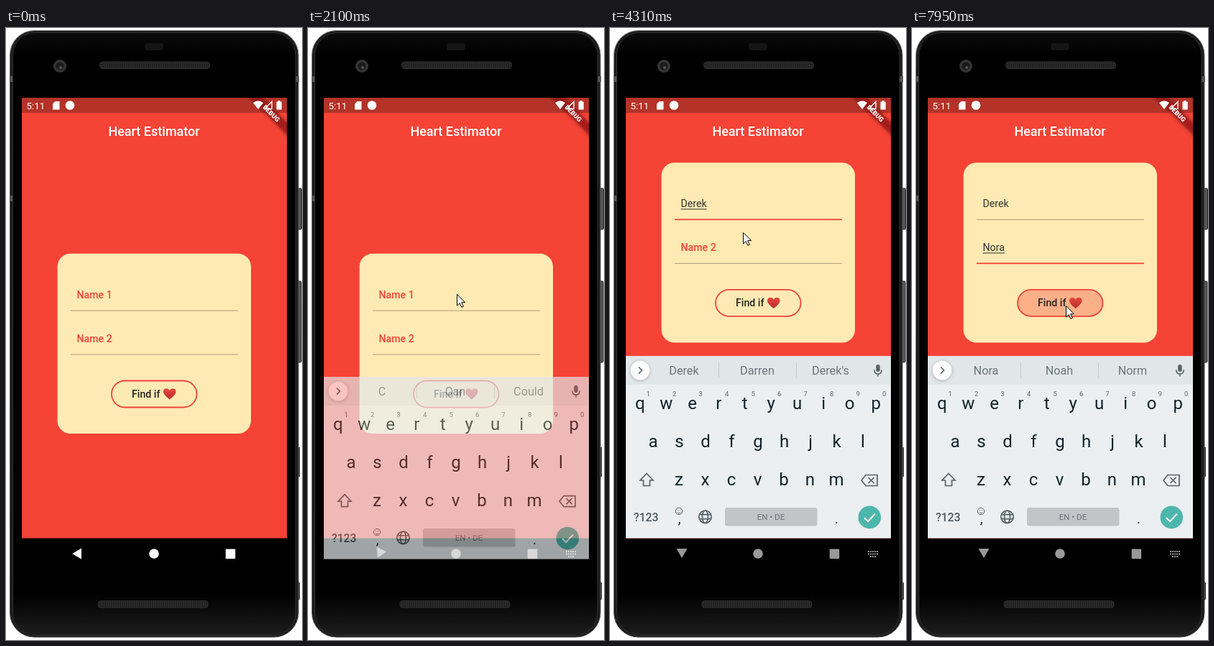
Write an HTML page that moves like this. It is 412 px wide and 851 px high and loops after 8 s.

```html
<!DOCTYPE html>
<html lang="en">
<head>
<meta charset="utf-8">
<title>Phone form</title>
<style>
  html, body { margin: 0; width: 100%; height: 100%; overflow: hidden; background: #fff; }
  svg { display: block; width: 100%; height: 100%; font-family: Roboto, sans-serif; }
  text { white-space: pre; }
  .mid { text-anchor: middle; }
  .line { fill: none; stroke: #566267; stroke-width: 1.7; }
</style>
</head>
<body>
<svg viewBox="0 0 412 851">
  <defs>
    <clipPath id="screen"><rect x="22" y="97" width="369" height="656"/></clipPath>
    <linearGradient id="edge" x2="0" y2="1">
      <stop offset="0" stop-color="#858585"/><stop offset=".08" stop-color="#5a5a5a"/><stop offset="1" stop-color="#4a4a4a"/>
    </linearGradient>
    <linearGradient id="glass" x2="0" y2="1">
      <stop offset="0" stop-color="#0b0b0b"/><stop offset=".04" stop-color="#000"/>
      <stop offset=".93" stop-color="#000"/><stop offset="1" stop-color="#1e1e1e"/>
    </linearGradient>
    <linearGradient id="love" x2="0" y2="1">
      <stop offset="0" stop-color="#ea4a3c"/><stop offset="1" stop-color="#b92c2b"/>
    </linearGradient>
    <pattern id="mesh" width="3" height="3" patternUnits="userSpaceOnUse">
      <rect width="3" height="3" fill="#1d1d1d"/><circle cx="1.5" cy="1.5" r=".9" fill="#393939"/>
    </pattern>
    <filter id="soft" x="-50%" y="-150%" width="200%" height="400%"><feGaussianBlur stdDeviation="2.5"/></filter>
  </defs>

  <!-- phone -->
  <g fill="#565656" stroke="#2a2a2a">
    <rect x="404" y="223" width="7.5" height="57" rx="1.5"/>
    <rect x="404" y="352" width="7" height="113" rx="1.5"/>
    <rect x="404" y="583" width="4.5" height="41" rx="1"/>
    <rect x="404" y="771" width="4.5" height="24" rx="1"/>
  </g>
  <rect x="5.5" y="3.500" width="401.500" height="843.500" rx="34" fill="#1c1c1c" stroke="url(#edge)"/>
  <path d="M5 67h6v8H5zM5 233h6v8H5zM402 67h6v8h-6z" fill="#555"/>
  <rect x="9.500" y="6.500" width="393.500" height="838" rx="31" fill="url(#glass)" stroke="#303030"/>
  <rect x="193" y="21" width="26" height="10" rx="4" fill="#141414"/>
  <circle cx="75" cy="53" r="9" fill="#353535"/>
  <circle cx="75" cy="53" r="5.500" fill="#1a1a1c"/>
  <circle cx="76" cy="55" r="2" fill="#50555b"/>
  <rect x="130.500" y="47" width="153" height="9.500" rx="4" fill="url(#mesh)" stroke="#303030"/>
  <rect x="128" y="796.500" width="153" height="9.500" rx="4" fill="url(#mesh)" stroke="#303030"/>

  <g clip-path="url(#screen)">
    <path d="M22 97H391V753H22z"/>
    <path d="M22 97H391V709.500H22z" fill="#f54336"/>
    <text class="mid" x="206" y="150" font-size="18" font-weight="500" fill="#fff">Heart Estimator</text>
    <path d="M22 97H391V118H22z" fill="#b43228"/>
    <g transform="translate(391 97) rotate(45)">
      <rect x="-60" y="25" width="120" height="11" opacity=".5" filter="url(#soft)"/>
      <rect x="-60" y="25" width="120" height="11" fill="#b71c1c" opacity=".63"/>
      <text class="mid" y="33.800" font-size="9" font-weight="900" fill="#fff">DEBUG</text>
    </g>
    <g fill="#fff">
      <text x="28.500" y="112.500" font-size="13.300">5:11</text>
      <path d="M68.500 102H74.500V113.500H65V105.500z"/>
      <circle cx="89" cy="107.500" r="6.300"/>
      <path d="M344 104q7-5.500 14 0l-7 9z"/>
      <path d="M370 102.500v10h-10z" fill="none" stroke="#fff" stroke-width="1.400"/>
      <path d="M376.500 102.500h2v-1.500h3.200v1.500h2v11h-7.200z"/>
    </g>

    <g id="card">
      <rect x="71.600" y="313.800" width="269.400" height="250.300" rx="18" fill="#ffeab3"/>
      <g id="fields"></g>
      <rect id="fill" x="147" y="490.500" width="118.500" height="37" rx="18.500" fill="#f44336" fill-opacity="0" stroke="#f0433a" stroke-width="1.800"/>
      <text x="175" y="514" font-size="14.200" font-weight="500" fill="#222">Find if</text>
      <path d="M227.800 516.500C221 511 219 508.500 219 505.500C219 500.500 225.500 500 227.800 504C230 500 236.500 500.500 236.500 505.500C236.500 508.500 234.500 511 227.800 516.500z" fill="url(#love)"/>
    </g>

    <g id="kb">
      <path d="M22 456.200H391V709.500H22z" fill="#ebeff2"/>
      <path d="M22 456.200H391V496H22z" fill="#e1e6e9"/>
      <g id="words" fill="#6b767b" font-size="16.200">
        <path d="M151.500 465.500V486.500M259.500 465.500V486.500" stroke="#c6cbce"/>
      </g>
      <g id="tools" class="line">
        <circle cx="90" cy="474.500" r="5"/><path d="M93.500 478L100 484.500" stroke-width="2.200"/>
        <path d="M141 470h10q2 0 2 2v6l-5 5h-7q-2 0-2-2v-9q0-2 2-2zM153 478h-5v5M142.500 477q3 4 6 0M143 473.500h2M147.500 473.500h2"/>
        <text class="mid" x="199.500" y="480.500" font-size="12.500" font-weight="900" fill="#566267" stroke="none">GIF</text>
        <path d="M248 469.500h14v14h-14z" fill="#566267" stroke="none"/>
        <path d="M287 465.500V486.500" stroke="#c6cbce" stroke-width="1"/>
        <path d="M313 476h.1M320 476h.1M327 476h.1" stroke-width="4" stroke-linecap="round"/>
      </g>
      <circle cx="42" cy="477" r="13.500" opacity=".22" filter="url(#soft)"/>
      <circle cx="42" cy="476" r="13.300" fill="#fff"/>
      <path id="chevron" d="M40 471.500L44.500 476L40 480.500" class="line"/>
      <rect x="370.300" y="468" width="5.400" height="10" rx="2.700" fill="#566267"/>
      <path d="M367.800 475.500q.3 5.500 5.200 5.500t5.200-5.500M373 481v3.500" class="line"/>

      <g id="keys" class="mid" font-size="24" fill="#10222a"></g>
      <path id="shift" d="M51 619.500L60 629H55.500V636.500H46.500V629H42z" class="line"/>
      <path d="M356 621.500h16v15h-16l-6-7.500zM359.500 625l8 8m0-8l-8 8" class="line"/>
      <text x="33" y="685.500" font-size="15.700" font-weight="500" fill="#4b5a60">?123</text>
      <g class="line" style="stroke-width:1">
        <circle cx="96" cy="672" r="4.700"/><path d="M93.500 673.500q2.500 3 5 0M94 670.500h1M97 670.500h1"/>
      </g>
      <text class="mid" x="96.500" y="688.500" font-size="19" fill="#10222a">,</text>
      <g class="line">
        <circle cx="132.500" cy="679.700" r="8.700"/><ellipse cx="132.500" cy="679.700" rx="4" ry="8.700"/>
        <path d="M124 676.700h17M124 682.700h17"/>
      </g>
      <rect x="160" y="667" width="128.500" height="25.500" rx="3" fill="#c1c5c8"/>
      <text class="mid" x="224" y="684.300" font-size="11.500" fill="#687176">EN • DE</text>
      <text class="mid" x="315.500" y="688.500" font-size="20" fill="#10222a">.</text>
      <circle cx="361.300" cy="680.400" r="15.800" fill="#4db6ac"/>
      <path d="M354 681L359 686L369 675.500" class="line" style="stroke:#fff;stroke-width:2"/>
    </g>

    <g id="nav">
      <path id="back" d="M92 731L105 723.500V738.500z"/>
      <circle cx="206" cy="731" r="6.800"/>
      <rect x="305.700" y="724.500" width="13.500" height="13.500" rx="1"/>
      <path id="kbIcon" d="M359 728h14M359 731.500h14M362 735h8" fill="none" stroke-width="2" stroke-dasharray="2 1"/>
    </g>
  </g>
  <path id="mouse" d="M.5 .5V16L4.200 12.600L6.800 18.300L9.300 17.200L6.700 11.600H11.600z" fill="#fff" stroke="#000"/>
</svg>
<script>
const LOOP = 8000;
const $ = id => document.getElementById(id);
const clamp = x => Math.max(0, Math.min(1, x));
const ramp = (t, a, b) => clamp((t - a) / (b - a));

function add(parent, tag, attrs, text) {
  const el = document.createElementNS('http://www.w3.org/2000/svg', tag);
  set(el, attrs);
  if (text) el.textContent = text;
  parent.appendChild(el);
  return el;
}
function set(el, attrs) {
  for (const k in attrs) el.setAttribute(k, attrs[k]);
}
function setText(el, s) {
  if (el.textContent !== s) el.textContent = s;
}

// each entry: time, letters shown, three suggestions
const typing = [
  [[2710, 'D', 'D|Did|Day'], [2960, 'De', 'De|Dear|Den'], [3200, 'Der', 'Der|Derby|Deer'],
   [3320, 'Dere', 'Dere|Derek|Were'], [3450, 'Derek', 'Derek|Darren|Derek\'s']],
  [[5880, 'N', 'N|Not|Now'], [6050, 'No', 'No|Not|Now'],
   [6290, 'Nor', 'Nor|North|Norm'], [6340, 'Nora', 'Nora|Noah|Norm']]
];
const events = typing.flat();
const resets = [2240, 5060, ...events.map(e => e[0])].sort((a, b) => a - b);
const latest = (list, t) => list.filter(e => e[0] <= t).pop();

const fields = [0, 1].map(i => {
  const y = 376 + 61 * i, g = $('fields');
  return {
    y,
    hint: add(g, 'text', {x: 98.5, y, 'font-size': 14.2, 'font-weight': 500, fill: '#f44336'}, 'Name ' + (i + 1)),
    text: add(g, 'text', {x: 98.5, y, 'font-size': 14.2, fill: '#333'}),
    mark: add(g, 'rect', {x: 98.5, y: y + 2, height: 1, fill: '#333'}),
    line: add(g, 'rect', {x: 90, width: 233}),
    caret: add(g, 'rect', {y: y - 14, width: 1.8, height: 17.5, fill: '#f44336'})
  };
});

const words = [103, 205, 307].map(x => add($('words'), 'text', {x, y: 482.3, class: 'mid'}));
const letters = [];
['qwertyuiop', 'asdfghjkl', 'zxcvbnm'].forEach((row, r) => {
  [...row].forEach((ch, i) => {
    const x = [41.7, 60, 96][r] + 36.5 * i;
    letters.push({ch, el: add($('keys'), 'text', {x, y: 530 + 53 * r})});
    if (!r) add($('keys'), 'text', {x: x + 11.5, y: 511.5, 'font-size': 9.5, fill: '#5c686d'}, String((i + 1) % 10));
  });
});

const mousePath = [
  [230, 372, 853], [500, 340, 695], [750, 255, 430], [940, 212, 355], [1070, 212, 355], [1280, 207, 370],
  [4130, 207, 370], [4310, 185, 284], [4610, 182, 294], [4790, 182, 294], [4900, 182, 296],
  [5050, 182, 296], [5190, 182, 303], [6980, 182, 303], [7400, 196, 345], [7770, 214, 386]
];
function mouseAt(t) {
  let i = mousePath.findIndex(p => p[0] > t);
  if (i < 0) i = mousePath.length;
  const a = mousePath[Math.max(0, i - 1)], b = mousePath[i] || a;
  const k = a === b ? 0 : (t - a[0]) / (b[0] - a[0]);
  return [a[1] + (b[1] - a[1]) * k, a[2] + (b[2] - a[2]) * k];
}

function drawFields(t) {
  const focus = t < 2120 ? -1 : t < 5060 ? 0 : 1;
  const since = t - (resets.filter(r => r <= t).pop() || t);
  const blink = since % 960 < 480;
  fields.forEach((f, i) => {
    const active = i === focus, typed = latest(typing[i], t);
    setText(f.text, typed ? typed[1] : '');
    const w = typed ? f.text.getComputedTextLength() : 0;
    set(f.hint, {opacity: typed ? 0 : 1});
    set(f.mark, {width: w, opacity: active && typed ? 1 : 0});
    set(f.line, {y: f.y + (active ? 16 : 16.5), height: active ? 1.8 : 1, fill: active ? '#f44336' : '#a99d7c'});
    set(f.caret, {x: 98.5 + w, opacity: active && blink ? 1 : 0});
  });
  set($('card'), {transform: `translate(0 ${focus < 0 ? 0 : -126.6})`});
}

function drawKeyboard(t) {
  const slide = (1 - ramp(t, 1990, 2240)) ** 2.5;
  const fade = (1 - ramp(t, 1975, 2262)) ** 2;
  set($('kb'), {transform: `translate(0 ${126 * slide})`, opacity: t < 1990 ? 0 : 1 - fade});

  const open = ramp(t, 2200, 2250) - ramp(t, 2710, 2850) + ramp(t, 5050, 5190) - ramp(t, 5880, 6040);
  set($('tools'), {opacity: open});
  set($('chevron'), {transform: `rotate(${-180 * open} 42 476)`});
  set($('words'), {opacity: t > 2110 && t < 2710 ? 0 : 1 - open});
  const now = latest(events, t);
  (now ? now[2] : 'C|Can|Could').split('|').forEach((w, i) => setText(words[i], w));

  const caps = t >= 5800 && t < 5880;
  letters.forEach(l => setText(l.el, caps ? l.ch.toUpperCase() : l.ch));
  $('shift').style.fill = caps ? '#566267' : 'none';
}

function drawNav(t) {
  const dim = t < 1960 ? ramp(t, 230, 1590) : ramp(t, 2070, 2190);
  const v = Math.round((t < 1960 ? 255 : 238) * (1 - dim) + 153 * dim);
  const color = `rgb(${v},${v},${v})`;
  set($('nav'), {fill: color});
  set($('back'), {transform: `rotate(${-90 * ramp(t, 2005, 2140)} 99 730)`});
  set($('kbIcon'), {stroke: color, opacity: ramp(t, 1990, 2100)});
}

function draw(t) {
  drawFields(t);
  drawKeyboard(t);
  drawNav(t);
  set($('fill'), {'fill-opacity': 0.06 * ramp(t, 7600, 7680) + 0.29 * ramp(t, 7910, 7950)});
  const [x, y] = mouseAt(t);
  set($('mouse'), {transform: `translate(${x} ${y})`});
}

const start = performance.now();
function tick() {
  draw((performance.now() - start) % LOOP);
  requestAnimationFrame(tick);
}
draw(0);
requestAnimationFrame(tick);
</script>
</body>
</html>
```
